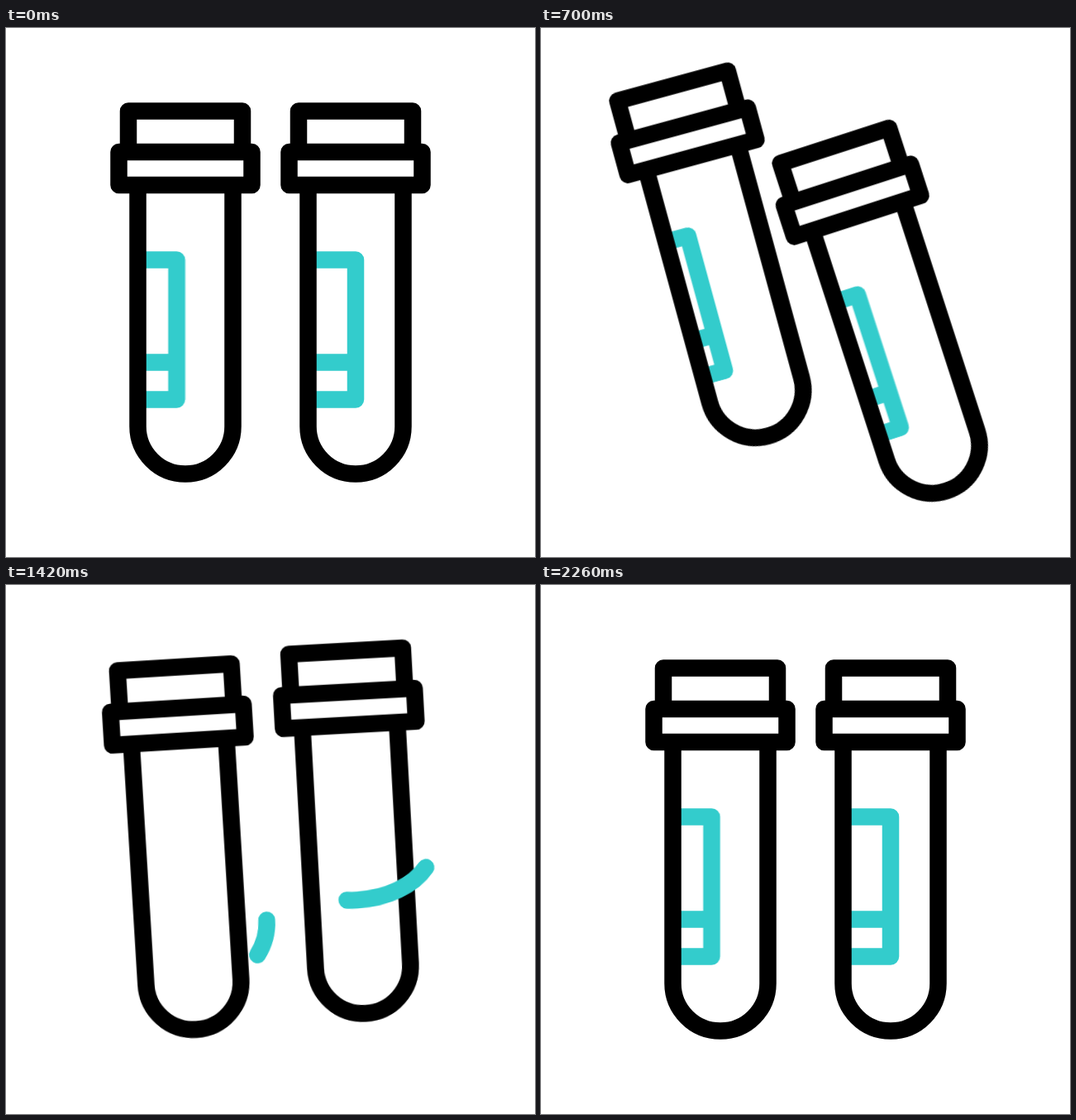
Recreate the animation shown at these times as an HTML page. Size 640 by 640 pixels, loop 3.6 s.

```html
<!DOCTYPE html>
<html lang="en">
<head>
<meta charset="utf-8">
<title>Test tubes</title>
<style>
  @property --head { syntax: "<number>"; inherits: false; initial-value: 0; }
  @property --tail { syntax: "<number>"; inherits: false; initial-value: 0; }

  html, body { margin: 0; width: 100%; height: 100%; overflow: hidden; background: #fff; }
  svg { display: block; width: 100%; height: 100%; }
  path { fill: none; stroke: #000; stroke-width: 20.5; stroke-linejoin: round; }
  .label path, .swoosh { stroke: #33cccc; }

  .bob, .tilt, .label, .swoosh {
    animation-duration: 3.6s;
    animation-iteration-count: infinite;
    animation-timing-function: cubic-bezier(.37, 0, .63, 1);
  }

  .swoosh {
    stroke-linecap: round;
    stroke-dasharray: calc((var(--head) - var(--tail)) * 1px) 300px;
    stroke-dashoffset: calc(var(--tail) * -1px);
    visibility: hidden;
  }

  .left .bob { animation-name: bob-left; }
  .left .tilt { animation-name: tilt-left; }
  .left .label { animation-name: spin-left; }
  .left .swoosh { animation-name: head-left, tail-left, show-left; }
  .right .bob { animation-name: bob-right; }
  .right .tilt { animation-name: tilt-right; }
  .right .label { animation-name: spin-right; }
  .right .swoosh { animation-name: head-right, tail-right, show-right; }

  @keyframes bob-left {
    0%, 53.33%, 100% { transform: translateY(0); }
    19.44% { transform: translateY(-38.2px); }
    33.33% { transform: translateY(13px); }
    45% { transform: translateY(-13.5px); }
  }
  @keyframes bob-right {
    0%, 2.78%, 58.33%, 100% { transform: translateY(0); }
    23.33% { transform: translateY(34px); }
    35.83% { transform: translateY(-29.5px); }
    48.61% { transform: translateY(17px); }
  }

  @keyframes tilt-left {
    0%, 1.39%, 58.33%, 100% { transform: rotate(0deg); }
    16.67% { transform: rotate(-18deg); }
    30.28% { transform: rotate(9.5deg); }
    39.72% { transform: rotate(-3.5deg); }
    48.61% { transform: rotate(1.2deg); }
  }
  @keyframes tilt-right {
    0%, 4.44%, 63.06%, 100% { transform: rotate(0deg); }
    20% { transform: rotate(-18deg); }
    32.5% { transform: rotate(9.5deg); }
    40.83% { transform: rotate(-4deg); }
    49.72% { transform: rotate(2deg); }
  }

  /* The label leaves on the right and its copy, 245px behind, comes in on the left. */
  @keyframes spin-left {
    0%, 5.56% { transform: translateX(-10.5px); }
    20%, 20.56% { transform: translateX(-30px); }
    49.44% { transform: translateX(261.5px); }
    59.44%, 100% { transform: translateX(234.5px); }
  }
  @keyframes spin-right {
    0%, 6.67% { transform: translateX(0); }
    21.67%, 22.22% { transform: translateX(-31px); }
    53.89% { transform: translateX(260px); }
    62.78%, 100% { transform: translateX(245px); }
  }

  @keyframes head-left { 0%, 22.22% { --head: 0; } 38.89%, 100% { --head: 100; } }
  @keyframes tail-left { 0%, 27.22% { --tail: 0; } 43.89%, 100% { --tail: 100; } }
  @keyframes show-left {
    0%, 22.5%, 43.7%, 100% { visibility: hidden; animation-timing-function: step-end; }
    22.51% { visibility: visible; animation-timing-function: step-end; }
  }
  @keyframes head-right { 0%, 26.67% { --head: 0; } 43.33%, 100% { --head: 100; } }
  @keyframes tail-right { 0%, 31.67% { --tail: 0; } 48.33%, 100% { --tail: 100; } }
  @keyframes show-right {
    0%, 26.9%, 48.1%, 100% { visibility: hidden; animation-timing-function: step-end; }
    26.91% { visibility: visible; animation-timing-function: step-end; }
  }
</style>
</head>
<body>
<svg viewBox="0 0 640 640">
  <defs>
    <clipPath id="inside"><rect x="-57" y="-130" width="114" height="350"/></clipPath>
    <g id="glass">
      <path d="M-57.5 -130V162A57.5 57.5 0 0 0 57.5 162V-130"/>
      <path d="M-69 -170V-219.5H69V-170"/>
      <path d="M-80.5 -170H80.5V-130H-80.5Z"/>
    </g>
  </defs>

  <g class="left" transform="translate(217 320)"><g class="bob"><g class="tilt">
    <g clip-path="url(#inside)"><g class="label">
      <path d="M0 -39.5V129.5H-78V-39.5ZM0 84.5H-78"/>
      <path d="M-245 -39.5V129.5H-323V-39.5ZM-245 84.5H-323"/>
    </g></g>
    <use href="#glass"/>
    <path class="swoosh" pathLength="100" d="M-96 92.5A94.5 80 0 0 0 93 92.5"/>
  </g></g></g>

  <g class="right" transform="translate(423 320)"><g class="bob"><g class="tilt">
    <g clip-path="url(#inside)"><g class="label">
      <path d="M0 -39.5V129.5H-74V-39.5ZM0 84.5H-74"/>
      <path d="M-245 -39.5V129.5H-319V-39.5ZM-245 84.5H-319"/>
    </g></g>
    <use href="#glass"/>
    <path class="swoosh" pathLength="100" d="M-98 18A95.5 64 0 0 0 93 18"/>
  </g></g></g>
</svg>
</body>
</html>
```
